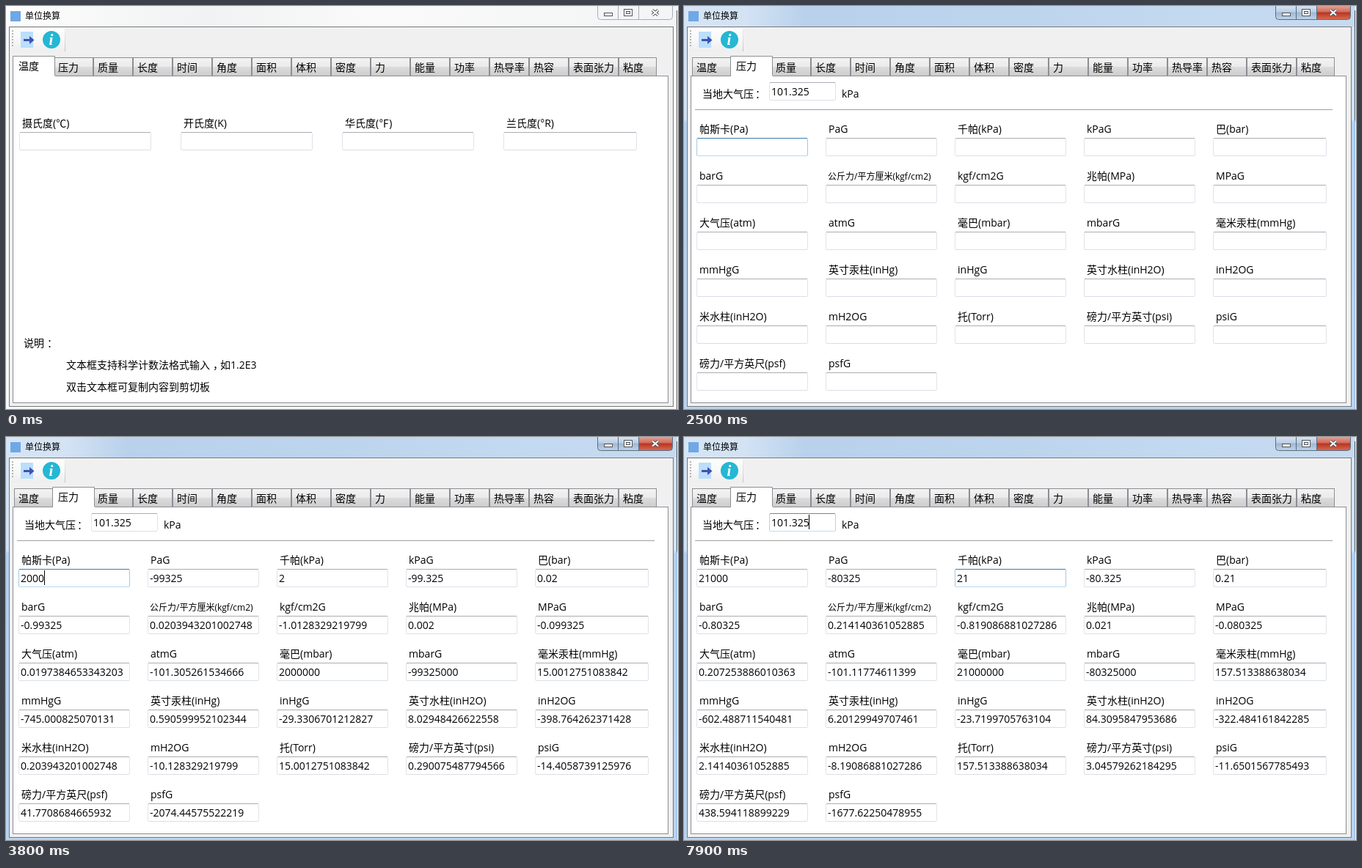
An HTML page with a canvas that plays this animation: 916x550 px, repeating every 8 s.

```html
<!DOCTYPE html>
<html lang="zh-CN">
<head>
<meta charset="utf-8">
<title>单位换算</title>
<style>
html, body { margin: 0; overflow: hidden; }
canvas { display: block; }
</style>
</head>
<body>
<canvas id="stage" width="916" height="550"></canvas>
<script>
const ctx = document.getElementById('stage').getContext('2d');
const LOOP = 8000, STEP = 100, ATM = 101325;
const FONT = '"Open Sans", "Noto Sans CJK SC", "Noto Sans CJK", sans-serif';
const TABS = '温度 压力 质量 长度 时间 角度 面积 体积 密度 力 能量 功率 热导率 热容 表面张力 粘度'.split(' ');

// Each unit: label and conversion from absolute (p) and gauge (g) pascal.
const UNITS = [
  ['帕斯卡(Pa)', p => p], ['PaG', (p, g) => g],
  ['千帕(kPa)', p => p / 1e3], ['kPaG', (p, g) => g / 1e3],
  ['巴(bar)', p => p / 1e5], ['barG', (p, g) => g / 1e5],
  ['公斤力/平方厘米(kgf/cm2)', p => p / 98066.52], ['kgf/cm2G', (p, g) => g / 98066.52],
  ['兆帕(MPa)', p => p / 1e6], ['MPaG', (p, g) => g / 1e6],
  ['大气压(atm)', p => p / ATM], ['atmG', p => p / ATM - ATM / 1e3],
  ['毫巴(mbar)', p => p * 1e3], ['mbarG', (p, g) => g * 1e3],
  ['毫米汞柱(mmHg)', p => p / 133.322], ['mmHgG', (p, g) => g / 133.322],
  ['英寸汞柱(inHg)', p => p / 3386.387], ['inHgG', (p, g) => g / 3386.387],
  ['英寸水柱(inH2O)', p => p / 249.082], ['inH2OG', (p, g) => g / 249.082],
  ['米水柱(inH2O)', p => p / 98066.52 * 10], ['mH2OG', (p, g) => g / 98066.52 * 10],
  ['托(Torr)', p => p / 133.322],
  ['磅力/平方英寸(psi)', p => p / 6894.757], ['psiG', (p, g) => g / 6894.757],
  ['磅力/平方英尺(psf)', p => p / 47.88025898], ['psfG', (p, g) => g / 47.88025898]
];

// Typed pressure in Pa, border highlight keys [time, level], caret spans [from, to, field].
const TYPED = [[3000, 2], [3300, 20], [3600, 200], [3800, 2000], [6800, 21000]];
const GLOW = {
  0: [[1700, 0], [2100, 1], [5400, 1], [5900, 0]],
  1: [[4200, 0], [4500, .7], [4900, .7], [5300, 0]],
  2: [[5000, 0], [5300, .7], [5400, .7], [5800, 1]],
  local: [[7200, 0], [7500, .7]]
};
const CARETS = [
  [2000, 2500, 0], [3000, 4300, 0], [4800, 5300, 0],
  [5600, 6100, 2], [6600, 7300, 2], [7800, 7900, 2], [7900, 8000, 'local']
];

function rect(x, y, w, h, fill) {
  ctx.fillStyle = fill;
  ctx.fillRect(x, y, w, h);
}

function frame(x, y, w, h, color) {
  ctx.strokeStyle = color;
  ctx.lineWidth = 1;
  ctx.strokeRect(x + .5, y + .5, w - 1, h - 1);
}

function text(str, x, y, size = 14, color = '#000') {
  ctx.font = `${size}px ${FONT}`;
  ctx.fillStyle = color;
  ctx.fillText(str, x, y);
}

function path(points, color, width) {
  ctx.beginPath();
  points.forEach(([x, y]) => ctx.lineTo(x, y));
  ctx.strokeStyle = color;
  ctx.lineWidth = width;
  ctx.stroke();
}

function gradient(x0, y0, x1, y1, ...stops) {
  const g = ctx.createLinearGradient(x0, y0, x1, y1);
  stops.forEach(([at, color]) => g.addColorStop(at, color));
  return g;
}

function mix(a, b, k) {
  return `rgb(${a.map((v, i) => Math.round(v + (b[i] - v) * k))})`;
}

function levelAt(keys, t) {
  if (!keys || t <= keys[0][0]) return 0;
  for (let i = 1; i < keys.length; i++) {
    const [t0, v0] = keys[i - 1], [t1, v1] = keys[i];
    if (t < t1) return v0 + (v1 - v0) * (t - t0) / (t1 - t0);
  }
  return keys[keys.length - 1][1];
}

function format(value) {
  const n = Number(value.toPrecision(15));
  if (n && Math.abs(n) < 1e-4) {
    return n.toExponential().replace(/e-(\d)$/, 'E-0$1');
  }
  return String(n);
}

function field(x, y, w, value = '', glow = 0, caret = false) {
  const h = 25;
  const side = mix([226, 227, 234], [164, 201, 227], glow);
  rect(x, y, w, h, '#fff');
  rect(x, y + 1, 1, h - 2, side);
  rect(x + w - 1, y + 1, 1, h - 2, side);
  rect(x + 1, y + h - 1, w - 2, 1, mix([218, 223, 230], [183, 217, 237], glow));
  rect(x + 1, y, w - 2, 1, mix([171, 173, 179], [61, 123, 173], glow));
  ctx.save();
  ctx.beginPath();
  ctx.rect(x + 2, y, w - 4, h);
  ctx.clip();
  text(value, x + 3, y + 18);
  if (caret) rect(Math.floor(x + 3 + ctx.measureText(value).width), y + 2, 1, 20, '#000');
  ctx.restore();
}

function captionButtons(active) {
  const pale = active
    ? gradient(0, 0, 0, 18, [0, '#d6e3f2'], [.45, '#bccee3'], [.5, '#9fb7d2'], [1, '#bdd2e8'])
    : '#f4f5f6';
  const edge = active ? '#5a6c80' : '#a9adb2';
  rect(807, 0, 101, 18, pale);
  if (active) {
    rect(863, 0, 45, 18, gradient(0, 0, 0, 18, [0, '#e3a195'], [.45, '#cf6a5a'], [.5, '#b93320'], [1, '#d46a50']));
  }
  ctx.beginPath();
  ctx.roundRect(806.5, -5.5, 102, 24, 4);
  ctx.strokeStyle = edge;
  ctx.lineWidth = 1;
  ctx.stroke();
  rect(834, 0, 1, 18, edge);
  rect(862, 0, 1, 18, edge);
  const ink = '#50545d';
  rect(815, 9, 12, 5, ink);
  rect(816, 10, 10, 3, '#fff');
  rect(842, 4, 12, 10, ink);
  rect(843, 5, 10, 8, '#fff');
  rect(845, 7, 6, 4, ink);
  rect(846, 8, 4, 2, '#fff');
  for (const [color, width] of [[ink, 4], ['#fff', 2]]) {
    path([[881, 5.5], [889, 12.5]], color, width);
    path([[889, 5.5], [881, 12.5]], color, width);
  }
}

function windowFrame(active) {
  rect(0, 0, 916, 550, active
    ? gradient(0, 0, 0, 550, [0, '#d4e4f5'], [.28, '#d0e2f4'], [.29, '#b4d0ee'], [1, '#bad3ee'])
    : '#f7f8f9');
  rect(0, 0, 916, 28, active
    ? gradient(0, 0, 916, 0, [0, '#d6e5f5'], [.09, '#d3e3f4'], [.18, '#b9d1eb'], [.5, '#bdd4ed'], [.75, '#c3d9f0'], [1, '#c6daf0'])
    : gradient(0, 0, 916, 0, [0, '#fdfdfd'], [.3, '#f1f2f3'], [.55, '#fafafa'], [1, '#f3f4f5']));
  rect(914, 6, 1, 544, active
    ? gradient(0, 0, 0, 550, [.28, '#4a5560'], [.29, '#8db9e6'], [1, '#8db9e6'])
    : '#5c5c5c');
  rect(915, 0, 1, 550, '#fff');
  rect(6, 7, 14, 14, '#6fa8e6');
  text('单位换算', 26, 18, 12);
  captionButtons(active);
  rect(4, 28, 906, 519, '#f0f0f0');
  frame(4, 28, 906, 519, '#77797c');
}

function toolbar() {
  rect(6, 30, 75, 32, gradient(0, 30, 0, 62, [0, '#fdfdfd'], [.5, '#f8f8f8'], [1, '#eeeeee']));
  rect(80, 31, 1, 31, gradient(0, 31, 0, 62, [0, '#f0f0f0'], [1, '#c4c4c4']));
  for (let y = 33; y < 57; y += 4) rect(8, y, 2, 2, '#b5b5b5');
  rect(20, 35, 17, 22, '#bbdefb');
  rect(24, 45, 9, 3, '#3f51b5');
  ctx.beginPath();
  ctx.moveTo(32, 41);
  ctx.lineTo(38.5, 46.5);
  ctx.lineTo(32, 52);
  ctx.fillStyle = '#3f51b5';
  ctx.fill();
  ctx.beginPath();
  ctx.arc(62, 46, 12, 0, Math.PI * 2);
  ctx.fillStyle = '#25b7d3';
  ctx.fill();
  ctx.font = 'italic bold 21px "Liberation Serif", serif';
  ctx.fillStyle = '#fff';
  ctx.fillText('i', 58.5, 53);
}

function tabEdge(i) {
  return i < 15 ? 11 + 54 * i : i === 15 ? 835 : 887;
}

function tabs(selected, hovered) {
  rect(9, 95, 894, 447, '#fff');
  frame(9, 95, 894, 447, '#8c8e94');
  const gray = gradient(0, 70, 0, 95, [0, '#f3f3f3'], [.5, '#ebebeb'], [.5, '#dddddd'], [1, '#cdcdcd']);
  const blue = gradient(0, 70, 0, 95, [0, '#eaf6fd'], [.5, '#d9f0fc'], [.5, '#bee6fd'], [1, '#a7d9f5']);
  TABS.forEach((name, i) => {
    const x = tabEdge(i), w = tabEdge(i + 1) - x;
    rect(x, 70, w, 25, i === hovered ? blue : gray);
    frame(x, 70, w, 26, i === hovered ? '#3c7fb1' : '#8c8e94');
    if (i !== selected) text(name, x + 6, 89);
  });
  const x = tabEdge(selected) - 2;
  rect(x, 68, 58, 28, '#fff');
  path([[x + .5, 96], [x + .5, 68.5], [x + 57.5, 68.5], [x + 57.5, 95]], '#8c8e94', 1);
  text(TABS[selected], x + 8, 87);
}

function temperaturePage() {
  ['摄氏度(℃)', '开氏度(K)', '华氏度(℉)', '兰氏度(°R)'].forEach((label, i) => {
    const x = 18 + 220 * i;
    text(label, x + 4, 165);
    field(x, 172, i === 3 ? 182 : 180);
  });
  text('说明', 24, 465);
  text('：', 56, 465);
  text('文本框支持科学计数法格式输入', 82, 495);
  text('，', 282, 495);
  text('如1.2E3', 292, 495);
  text('双击文本框可复制内容到剪切板', 82, 525);
}

function pressurePage(t) {
  const pascal = TYPED.reduce((value, [at, next]) => t >= at ? next : value, null);
  const span = CARETS.find(([from, to]) => t >= from && t < to);
  const caret = span ? span[2] : null;
  text('当地大气压', 25, 125);
  text('：', 97, 125);
  text('kPa', 215, 125);
  field(116, 104, 91, '101.325', levelAt(GLOW.local, t), caret === 'local');
  rect(15, 141, 869, 1, '#a0a0a0');
  UNITS.forEach(([label, convert], i) => {
    const col = i % 5, x = 17 + 176 * col, y = 180 + 64 * Math.floor(i / 5);
    const long = label.length > 15;
    text(label, x + (long ? 3 : 4), y - 7, long ? 12 : 14);
    const value = pascal === null ? '' : format(convert(pascal, pascal - ATM));
    field(x, y, col === 4 ? 155 : 152, value, levelAt(GLOW[i], t), caret === i);
  });
}

const start = performance.now();

function draw() {
  const t = Math.floor((performance.now() - start) % LOOP / STEP) * STEP;
  const active = t >= 700;
  windowFrame(active);
  toolbar();
  tabs(active ? 1 : 0, active || t < 300 ? -1 : t < 400 ? 2 : 1);
  if (active) pressurePage(t);
  else temperaturePage();
  requestAnimationFrame(draw);
}
draw();
</script>
</body>
</html>
```
